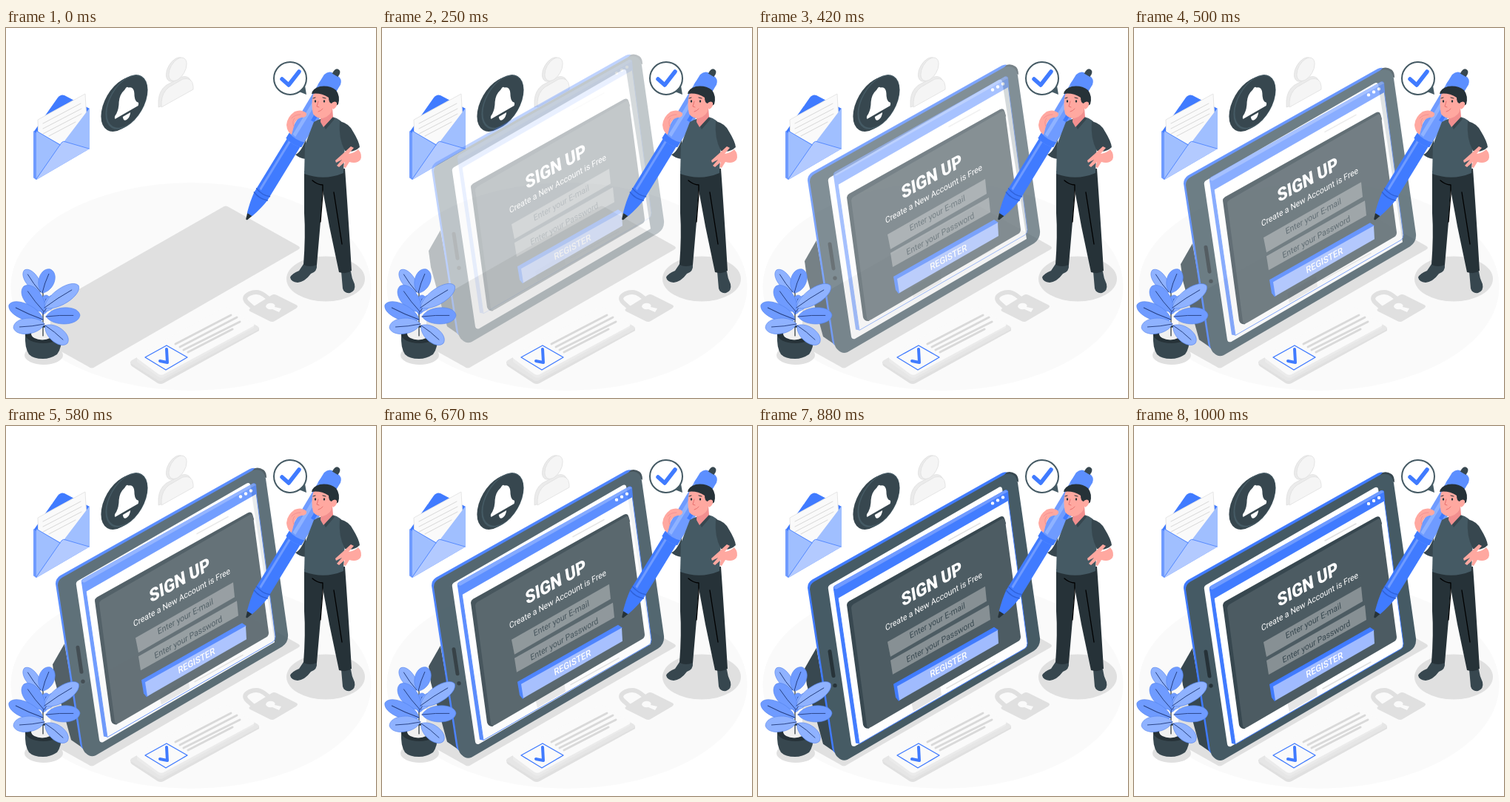
Animation of 500x500 px, one loop 1040 ms. Source, as an HTML page:

```html
<!DOCTYPE html>
<html lang="en">
<head>
<meta charset="utf-8">
<title>Sign up</title>
<style>
  html, body { margin: 0; width: 100%; height: 100%; overflow: hidden; background: #fff; }
  svg { display: block; width: 100vw; height: 100vh; }
  text { font-family: Roboto, Inter, sans-serif; text-anchor: middle; }
  .line { fill: none; stroke-linecap: round; stroke-linejoin: round; }
</style>
</head>
<body>
<svg viewBox="0 0 500 500">
  <!-- floor -->
  <ellipse cx="250" cy="349.500" rx="243.500" ry="140.500" fill="#fafafa"/>
  <g fill="#e0e0e0">
    <path d="M293 242Q297 239 301 242L394 294Q400 297 394 300L120 458Q116 461 112 458L60 429V375Z"/>
    <ellipse cx="432" cy="339" rx="53" ry="30.500"/>
    <ellipse cx="51" cy="442" rx="26" ry="13"/>
  </g>

  <!-- padlock -->
  <path class="line" stroke="#e0e0e0" stroke-width="6" d="M335 379L326 371Q319 364 329 359Q340 354 349 361L358 368"/>
  <path fill="#e0e0e0" d="M330 379L359 361Q362 359 366 361L392 374Q396 376 392 379L363 396Q360 398 356 396L330 383Q327 381 330 379Z"/>
  <path fill="#fafafa" d="M351 376Q353 371 360 372Q365 374 363 377L372 379L369 384L360 380Q352 381 351 376Z"/>

  <!-- envelope -->
  <path fill="#407bff" d="M37 141L70 94Q74 89 79 91L113 109V163L41 205L37 202Z"/>
  <path fill="#fafafa" stroke="#e6e6e6" d="M43 124L107 89L109 125L72 165L44 150Z"/>
  <path class="line" stroke="#d8d8d8" d="M50 129L101 102M50 136L102 109M50 143L102 116M58 146L94 127"/>
  <path fill="#6f9bff" d="M37 139L41 142V205L37 202Z"/>
  <path fill="#a0bfff" d="M41 139L75 158L113 108V163L41 205Z"/>
  <path fill="#b3caff" d="M41 205L75 155Q77 152 81 154L113 163Z"/>
  <path class="line" stroke="#407bff" stroke-width=".8" d="M41 204L75 155Q77 152 81 154L112 163M41 139L73 158"/>

  <!-- bell badge -->
  <g transform="matrix(.866 -.5 0 1 157 103)"><circle r="33" fill="#37474f"/></g>
  <g transform="matrix(.866 -.5 0 1 160 101.500)"><circle r="33" fill="#37474f"/></g>
  <g transform="matrix(.866 -.5 0 1 163 100)">
    <circle r="33" fill="#455a64"/>
    <circle r="31.500" cx=".8" fill="#37474f"/>
    <path fill="#fff" d="M-18 14Q-20 10 -16 8Q-12 3 -12 -6Q-11 -16 -3 -18Q0 -22 3 -18Q11 -16 12 -6Q12 3 16 8Q20 10 18 14ZM-6 17H6Q5 24 0 24Q-5 24 -6 17Z"/>
  </g>

  <!-- profile icon -->
  <g fill="#f5f5f5" stroke="#e0e0e0" stroke-width=".8">
    <path fill="#ebebeb" d="M206 107V98Q207 84 217 77L238 66Q247 64 250 72L212 105Z"/>
    <path d="M210 107V100Q211 87 220 80L239 69Q252 66 253 79V83Z"/>
    <g transform="matrix(.866 -.5 0 1 229 56)"><circle r="14.500" fill="#ebebeb"/><circle cx="3.500" cy="1.500" r="14"/></g>
  </g>

  <!-- tablet -->
  <g id="tablet" opacity="0">
    <path fill="#37474f" d="M79 300L63 328L66 350L88 430L104 441Z"/>
    <path fill="#407bff" d="M67 219Q67 212 73 208L329 64Q334 61 340 64L350 75L120 449L104 442Q101 440 100 435Z"/>
    <path fill="#37474f" d="M332 67L336 63Q342 61 348 65Q352 68 352 76Z"/>
    <path fill="#455a64" d="M70 221Q70 214 76 210.500L332 66.500Q348 61 351 77L381 287Q382 298 373 304L121 451Q114 454 108 448Q104 445 103 438Z"/>
    <path class="line" stroke="#263238" stroke-width="5" d="M97 305L102 338"/>
    <circle cx="104" cy="351" r="2.700" fill="#263238"/>
    <path fill="#fff" d="M95 221Q94 217 97 215L324 84Q329 81 330 85L363 298L131 433Q127 434 126 430Z"/>

    <!-- floating window -->
    <g id="window">
      <path fill="#407bff" d="M102 221L104 219L109 233L137 430L132 429Z"/>
      <path fill="#fff" stroke="#407bff" d="M108 232L338 99L364 294Q364 299 361 301L137 430Z"/>
      <path fill="#407bff" d="M102 221Q101 218 104 216L334 87Q337 86 338 89L339 101L107 234Z"/>
      <path fill="#6f9bff" d="M102 220L104 216L334 87L338 89L106 221Z"/>
      <g fill="#fff"><circle cx="317" cy="105" r="2.200"/><circle cx="324" cy="101" r="2.200"/><circle cx="331" cy="97" r="2.200"/></g>
      <path fill="#e6e6e6" d="M207 373L246 350L248 364L210 386Z"/>
      <path class="line" stroke="#e0e0e0" stroke-width="1.500" d="M255 355L320 319M258 155L300 132"/>
    </g>
  </g>

  <!-- form -->
  <g id="form" opacity="0">
    <path fill="#37474f" d="M120 242Q120 239 123 237L327 123Q332 121 333 125L335 132L150 409Q144 410 142 404Z"/>
    <path fill="#4c5b62" d="M126 246Q126 243 129 241L329 126Q333 124 334 128L355 285Q355 289 352 291L153 407Q148 410 147 405Z"/>
    <g fill="#879094">
      <path d="M175 292L307 217L309 237L179 312Z"/>
      <path d="M179 317L312 242L314 262L182 336Z"/>
    </g>
    <path fill="#407bff" d="M183 349L319 272L325 276L190 372L186 367Z"/>
    <path fill="#a0bbff" d="M188 352L324 276L325 294L191 371Z"/>
    <g id="labels"></g>
  </g>

  <!-- checked card -->
  <path fill="#e0e0e0" d="M168 451L342 405V409L213 480Q209 482 205 480L170 457Q168 455 168 451Z"/>
  <path fill="#e6e6e6" d="M170 449L292 380Q296 378 300 380L340 403Q344 406 340 408L212 476Q209 478 205 476L170 454Q167 451 170 449Z"/>
  <path fill="#ebebeb" d="M177 444L335 400V405L213 472Q209 474 205 471L177 451Z"/>
  <path fill="#fafafa" d="M178 442L293 378Q296 376 299 378L334 399Q337 401 334 403L213 468Q209 470 205 467L178 447Q175 444 178 442Z"/>
  <path class="line" stroke="#d9d9d9" stroke-width="3" stroke-linecap="butt" d="M229 427L304 388M235 431L312 391M240 435L316 397M246 438L306 407"/>
  <path class="line" stroke="#407bff" stroke-width="1.400" d="M188 445L217 429L245 445L216 462Z"/>
  <path class="line" stroke="#407bff" stroke-width="4" stroke-linecap="butt" d="M208 450L218 452L217 434"/>

  <!-- plant -->
  <path fill="#37474f" d="M26 414H75Q76 432 69 441Q60 447 50 447Q37 447 31 441Q25 432 26 414Z"/>
  <ellipse cx="50.500" cy="414" rx="24.500" ry="12" fill="#263238"/>
  <ellipse cx="49" cy="413" rx="15" ry="8.500" fill="#f0f0f0"/>
  <path class="line" stroke="#263238" stroke-width="1.200" d="M50 416V345"/>
  <g id="leaves"></g>

  <!-- pen -->
  <g transform="translate(325 259) rotate(-58.500)">
    <path fill="#263238" d="M0 -1L9 -4V4L0 1Z"/>
    <path fill="#407bff" d="M8 -4Q24 -9 37 -10.500H124V10.500H37Q24 9 8 4Z"/>
    <path fill="#6f9bff" d="M45 -7H122V-4H44Z"/>
    <path class="line" stroke="#2f62d9" stroke-width="1.500" d="M37 -10.500Q33 0 37 10.500M43 -10.500Q39 0 43 10.500"/>
    <path fill="#6f9bff" d="M122 -12Q118 0 122 12L211 13V-13Z"/>
    <path fill="#407bff" d="M122 -12Q118 0 122 12L130 12Q126 0 130 -12Z"/>
    <path fill="#8fb2ff" d="M131 -7H205V-2H130Z"/>
    <path fill="#407bff" d="M160 4H216V9H160Z"/>
    <path fill="#5c8fff" d="M206 -13Q203 0 206 13H222Q230 11 230 4V-4Q230 -11 222 -13Z"/>
    <path fill="#37474f" d="M229 -4.500H233Q238 -4 238 0Q238 4 233 4.500H229Z"/>
  </g>

  <!-- speech bubble -->
  <circle cx="384" cy="68" r="22" fill="#fff" stroke="#455a64" stroke-width="2"/>
  <path fill="#455a64" d="M396 86L406 90L404 78Z"/>
  <path class="line" stroke="#407bff" stroke-width="5.500" stroke-linecap="butt" d="M373 69L382 77L396 59"/>

  <!-- man -->
  <path fill="#37474f" d="M402 319L420 320Q421 329 412 332Q404 343 394 344Q385 343 384 337Q386 332 396 328ZM453 329H466Q467 338 471 346Q473 355 465 358Q457 359 455 352Z"/>
  <path fill="#263238" d="M403 193L458 190Q462 245 467 328Q460 333 450 330L437 268L428 219L425 262L420 320Q411 324 402 320Q405 280 403 250Z"/>
  <path class="line" stroke="#000" stroke-width="1.300" d="M414 206Q421 212 428 212V225L425 262M443 222L454 292"/>
  <path fill="#37474f" d="M391 171Q398 169 405 151V177Q396 176 391 171Z"/>
  <path fill="#ffa8a0" d="M379 131Q380 120 390 113Q399 109 406 115Q407 121 399 121Q391 123 389 133L386 144Q380 141 379 131Z"/>
  <path class="line" stroke="#f28f8f" stroke-width=".9" d="M386 122Q390 117 398 117M389 133Q386 126 390 122"/>
  <path fill="#455a64" d="M416 127Q428 120 441 120Q454 123 459 135L456 196Q430 207 403 197L404 158Z"/>
  <path fill="#37474f" d="M451 126Q464 129 469 140Q477 153 478 161Q470 169 458 166Q449 149 451 126ZM426 126L439 118L444 123L432 137Z"/>
  <path fill="#ffa8a0" d="M479 178Q474 184 464 181L459 189L456 188L458 181L450 188L447 186L454 178L446 182L445 179L454 171L466 160L470 162L463 170Q471 169 476 164Q482 171 479 178Z"/>
  <path fill="#f28f8f" d="M426 112L441 108L442 120L429 134L425 127Z"/>
  <path fill="#ffa8a0" d="M415 90Q421 82 440 88L447 99Q448 107 441 109Q439 119 428 122Q419 122 415 116Q412 103 415 90Z"/>
  <path fill="#263238" d="M413 89Q414 82 424 79Q437 77 446 84Q452 92 449 103Q445 107 444 102Q443 98 440 102Q436 101 436 94Q425 87 413 89Z"/>
  <path fill="#ffa8a0" d="M440 103Q444 97 447 101Q448 107 442 110Z"/>
  <g fill="#263238"><ellipse cx="418" cy="99" rx="1.200" ry="1.700"/><ellipse cx="430" cy="99" rx="1.200" ry="1.700"/></g>
  <path class="line" stroke="#263238" d="M415 95L418 94M428 94L432 95"/>
  <path class="line" stroke="#e8716f" d="M422 99L420 106L423 107M422 113Q426 112 428 109"/>
</svg>
<script>
const byId = id => document.getElementById(id);

// base x, base y, tip x, tip y, width, fill
const leaves = [
  [47, 357, 25, 327, 17, '#8fb2ff'], [49, 358, 60, 326, 21, '#6f9bff'],
  [50, 387, 55, 361, 14, '#6f9bff'], [52, 383, 66, 362, 14, '#8fb2ff'],
  [51, 383, 24, 349, 23, '#6f9bff'], [52, 378, 98, 348, 21, '#8fb2ff'],
  [50, 394, 4, 374, 21, '#6f9bff'], [52, 400, 10, 405, 21, '#8fb2ff'],
  [54, 390, 100, 388, 22, '#6f9bff'], [53, 402, 83, 426, 20, '#8fb2ff']
];
byId('leaves').innerHTML = leaves.map(([x, y, tx, ty, w, fill]) => {
  const l = Math.hypot(tx - x, ty - y), a = Math.atan2(ty - y, tx - x) * 180 / Math.PI, h = w * .67;
  return `<g transform="translate(${x} ${y}) rotate(${a})">
    <path fill="${fill}" stroke="#5585ee" stroke-width=".6" d="M0 0C${l * .2} ${-h} ${l * .95} ${-h} ${l} 0C${l * .95} ${h} ${l * .2} ${h} 0 0"/>
    <path class="line" stroke="#263f80" stroke-width=".9" d="M0 0Q${l * .4} -1.5 ${l * .8} 0"/></g>`;
}).join('');

// text, centre x, baseline y, size, weight, fill
const labels = [
  ['SIGN UP', 236, 222, 24.2, 900, '#fff'],
  ['Create a New Account is Free', 238, 241, 11.5, 400, '#fff'],
  ['Enter your E-mail', 243, 267, 11.5, 400, '#37474f'],
  ['Enter your Password', 247, 295, 11.5, 400, '#37474f'],
  ['REGISTER', 258, 327, 12.5, 500, '#fff']
];
byId('labels').innerHTML = labels.map(([s, x, y, size, weight, fill]) =>
  `<text transform="matrix(.87 -.483 .155 .98 ${x} ${y})" font-size="${size}" font-weight="${weight}" fill="${fill}">${s}</text>`
).join('');

const LOOP = 1040, DELAY = 45;
const bezier = (s, a, b) => 3 * s * (1 - s) * ((1 - s) * a + s * b) + s ** 3;

// cubic-bezier(.25, .1, .25, 1)
function ease(x) {
  let lo = 0, hi = 1;
  for (let i = 0; i < 24; i++) {
    const mid = (lo + hi) / 2;
    if (bezier(mid, .25, .25) < x) lo = mid; else hi = mid;
  }
  return bezier(lo, .1, 1);
}

// The window sits inside the tablet, so its drop and fade add to the tablet's.
const drops = { tablet: 40, window: 26, form: 40 };
const start = performance.now();
function draw() {
  const t = Math.max(0, performance.now() - start) % LOOP;
  const p = ease(Math.min(1, Math.max(0, (t - DELAY) / (1000 - DELAY))));
  for (const [id, drop] of Object.entries(drops)) {
    byId(id).setAttribute('opacity', p);
    byId(id).setAttribute('transform', `translate(0 ${-drop * (1 - p)})`);
  }
  requestAnimationFrame(draw);
}
draw();
</script>
</body>
</html>
```
